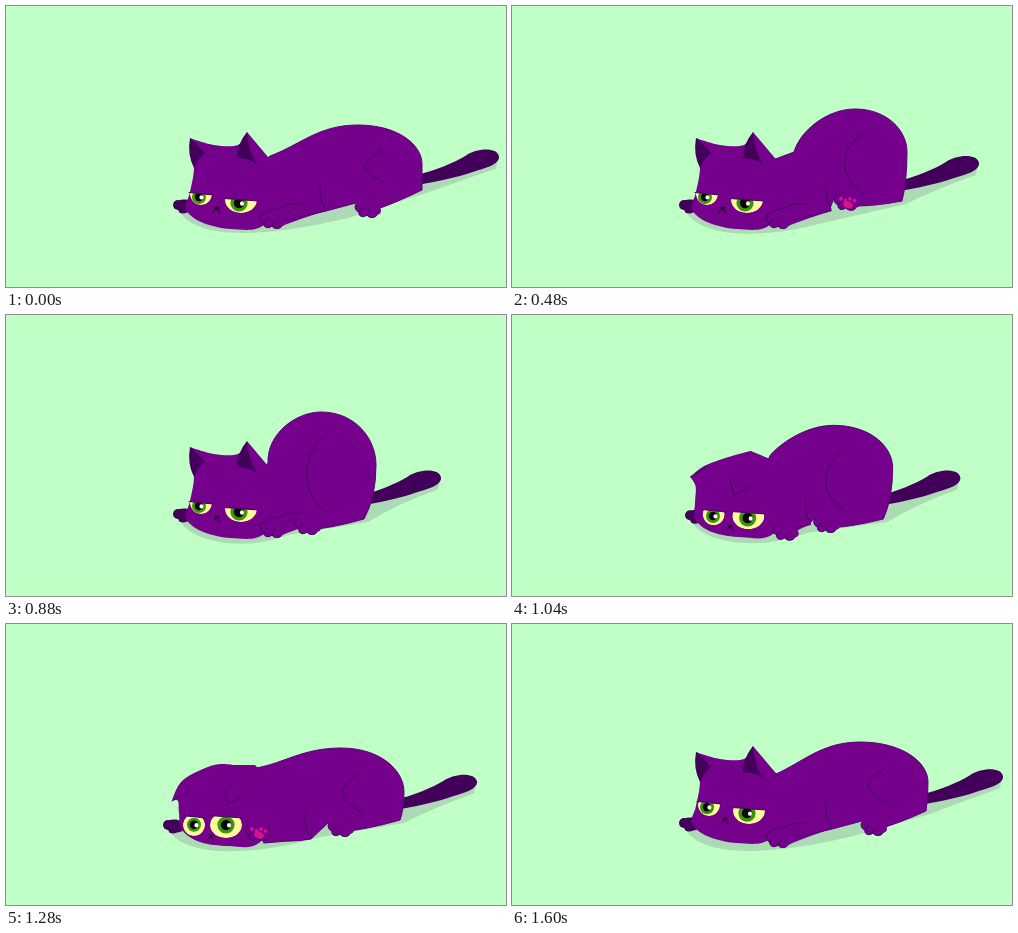
An HTML page with a canvas for the animation above (1680 ms loop, 500x281 px).

```html
<!DOCTYPE html>
<html lang="en">
<head>
<meta charset="utf-8">
<title>Crawling cat</title>
<style>
  html, body { margin: 0; width: 100%; height: 100%; overflow: hidden; background: #c0ffc6; }
  canvas { display: block; width: 500px; height: 281px; }
</style>
</head>
<body>
<canvas id="stage" width="500" height="281"></canvas>
<script>
const ctx = document.getElementById('stage').getContext('2d');
const LOOP = 1680, STEP = 80;
const C = {
  bg: '#c0ffc6', shade: '#abdab5', fur: '#74008c', dark: '#43005b', line: '#43006a',
  yellow: '#fdfb9b', green: '#3e9410', pink: '#d8128c', ink: '#21002f'
};

// Head outline with ears up, and pressed down with ears folded
const UP = [188,161, 184,132, 208,139, 232,139, 241,126, 263,152, 282,180, 258,219, 225,223, 195,216, 180,203, 184,186];
const DOWN = [177,177, 171,177, 182,156, 213,141, 233,141, 254,141, 283,180, 258,219, 228,222, 199,218, 181,206, 178,189];

const mix = (a, b, k) => a + (b - a) * k;
const easeOut = k => 1 - (1 - k) ** 1.5;

// Joints at the turning points of the crawl
const rest = {
  t: 0, neck: [264, 150], top: [352, 119], back: [416, 158], heel: [416, 184], toe: [352, 207],
  elbow: [320, 205], fore: [267, 214], head: [0, 0], face: [215, 191], lids: [0, 0]
};
const poses = [
  rest,
  { ...rest, t: 480, neck: [282, 146], top: [343, 103], back: [395, 146], heel: [390, 195], toe: [325, 211] },
  { ...rest, t: 880, neck: [262, 148], top: [315, 97], back: [370, 150], heel: [358, 204], toe: [292, 215], ease: easeOut },
  {
    t: 1120, neck: [256, 137], top: [325, 117], back: [386, 154], heel: [378, 204], toe: [311, 212],
    elbow: [289, 212], fore: [277, 218], head: [4.5, 0], face: [221, 205], lids: [5, 1]
  },
  {
    t: 1280, neck: [250, 144], top: [335, 124], back: [398, 168], heel: [394, 196], toe: [325, 208],
    elbow: [305, 215], fore: [252, 208], head: [-5, 0], face: [204, 201], lids: [8, 1]
  },
  { ...rest, t: 1600, top: [348, 118], heel: [414, 187], fore: [267, 215], head: [0, -4], face: [217, 184], lids: [2, 0] },
  { ...rest, t: LOOP }
];

function poseAt(t) {
  const i = poses.findIndex(p => p.t > t);
  const a = poses[i - 1], b = poses[i];
  const raw = (t - a.t) / (b.t - a.t), k = b.ease ? b.ease(raw) : raw;
  const p = {};
  for (const key in a) {
    if (Array.isArray(a[key])) p[key] = a[key].map((v, n) => mix(v, b[key][n], k));
  }
  [p.open, p.duck] = p.lids;
  // The hind foot leaves the ground while it steps forward
  const lift = t < 880 ? 14 * Math.sin(Math.PI * (t / 880) ** 2) : 0;
  p.foot = [p.toe[0], p.toe[1] - lift];
  p.far = [176 + 2 * p.head[0], 200 + 2 * p.duck];
  p.tail = [p.heel[0], 62 + 0.6 * p.heel[1]];
  p.skull = UP.map((v, n) => mix(v, DOWN[n], p.duck) + p.head[n % 2]);
  return p;
}

// Closed Catmull-Rom curve; listed points stay sharp
function blob(p, sharp) {
  const n = p.length / 2;
  const at = i => [p[((i + n) % n) * 2], p[((i + n) % n) * 2 + 1]];
  const slope = i => {
    if (sharp.includes(i % n)) return [0, 0];
    const a = at(i - 1), b = at(i + 1);
    return [(b[0] - a[0]) / 6, (b[1] - a[1]) / 6];
  };
  const path = new Path2D();
  path.moveTo(p[0], p[1]);
  for (let i = 0; i < n; i++) {
    const a = at(i), b = at(i + 1), u = slope(i), v = slope(i + 1);
    path.bezierCurveTo(a[0] + u[0], a[1] + u[1], b[0] - v[0], b[1] - v[1], b[0], b[1]);
  }
  path.closePath();
  return path;
}

function fill(path, color) {
  ctx.fillStyle = color;
  ctx.fill(path);
}

function stroke(path, color = C.line) {
  ctx.strokeStyle = color;
  ctx.stroke(path);
}

function oval(x, y, rx, ry, color, turn = 0) {
  const path = new Path2D();
  path.ellipse(x, y, rx, ry, turn, 0, Math.PI * 2);
  fill(path, color);
}

function at([x, y], draw) {
  ctx.save();
  ctx.translate(x, y);
  draw();
  ctx.restore();
}

const shape = d => new Path2D(d);
const tailShape = shape('M-8-3C15-8 32-16 44-23C54-30 75-32 77-22C78-14 62-10 52-7C35-1 15 3-8 7Z');
const pawShape = shape('M-10-7C-15-4-13 2-9 3C-10 8-4 9-1 6C1 10 8 9 9 6C13 5 14 2 12-1L4-8Z');
const pawLines = shape('M-10-7C-15-4-13 2-9 3C-10 8-4 9-1 6C1 10 8 9 9 6M-9 3Q-8 0-5-1M-1 6Q-1 2 2 1');
const sleeve = shape('M-13-3C-8-12 5-10 13-15Q20-17 28-16');
const earL = shape('M0 0Q-3 16 4 30Q8 20 15 15Q6 5 0 0Z');
const earR = shape('M0 0Q-10 12-10 26Q2 26 10 32Q1 18 0 0Z');
const foldL = shape('M0 0L16-10');
const foldR = shape('M-4-15L0 0L20-11');
const mouth = shape('M-4 4Q-2 1 0 1Q2 2 3 5');

function shadow({ far, toe, heel, tail }) {
  const [x, y] = far, [tx, ty] = tail;
  const path = new Path2D();
  path.moveTo(x - 2, y + 6);
  path.bezierCurveTo(x + 12, 229, x + 65, 236, toe[0] - 10, toe[1] + 5);
  path.lineTo(heel[0] + 4, heel[1] + 3);
  path.quadraticCurveTo(tx + 34, ty + 4, tx + 74, ty - 10);
  path.lineTo(tx + 76, ty - 20);
  path.lineTo(tx, ty);
  path.closePath();
  fill(path, C.shade);
}

function torso({ skull, neck, top, back, heel, foot, elbow }) {
  const [nx, ny] = neck, [x, y] = top, [bx, by] = back, [hx, hy] = heel, [fx, fy] = foot;
  const wide = x - nx, rise = ny - y;
  const path = new Path2D();
  path.moveTo(skull[10] - 5, skull[11] + 3);
  path.lineTo(nx, ny);
  // A taller hump starts more steeply
  path.bezierCurveTo(nx + (wide - 54) * 0.9, ny - rise * rise / 85, x - wide * 0.45, y, x, y);
  path.bezierCurveTo(mix(x, bx, 0.62), y, bx, mix(by, y, 0.5), bx, by);
  path.quadraticCurveTo(bx, mix(by, hy, 0.6), hx, hy);
  path.quadraticCurveTo((hx + fx) / 2, (hy + fy) / 2 + 4, fx + 8, fy);
  path.lineTo(fx - 2, fy - 10);
  path.lineTo(Math.min(elbow[0], fx - 8), elbow[1]);
  path.lineTo(258, 219);
  path.closePath();
  fill(path, C.fur);
  stroke(path, '#5b0079');

  const hip = new Path2D();
  hip.moveTo(hx - 40, y + 25);
  hip.bezierCurveTo(hx - 62, y + 40, hx - 66, hy - 24, hx - 36, hy - 6);
  stroke(hip);
}

function foreleg({ elbow, fore }) {
  const [x, y] = elbow, path = new Path2D();
  path.moveTo(x - 25, y - 25);
  path.lineTo(x - 6, y - 25);
  path.quadraticCurveTo(x - 7, y - 12, x, y);
  path.quadraticCurveTo(x - 18, y + 5, fore[0] + 6, fore[1] + 7);
  path.lineTo(fore[0] - 5, fore[1]);
  fill(path, C.fur);
}

function elbowLine([x, y]) {
  const path = new Path2D();
  path.moveTo(x - 6, y - 26);
  path.quadraticCurveTo(x - 7, y - 12, x - 1, y - 2);
  stroke(path);
}

function paw(pos, pads, arm) {
  at(pos, () => {
    fill(pawShape, C.fur);
    stroke(pawLines);
    if (arm) stroke(sleeve);
    if (!pads) return;
    oval(1, 3, 5, 3.5, C.pink, 0.3);
    for (let i = 0; i < 4; i++) oval(-6 + i * 4.5, -3 + (i % 2) * 2, 1.8, 2, C.pink);
  });
}

function farPaw([x, y]) {
  oval(x + 3, y, 10, 6.5, C.dark, 0.15);
  oval(x - 4, y - 1, 5, 5, C.dark);
  oval(x + 1, y + 4, 4.5, 3.5, C.dark);
}

// side: -1 for the small far eye, 1 for the near one
function eye({ face, duck, open }, side) {
  const x = face[0] + side * (20 - 4 * duck), y = face[1] + side * 3 * (1 - duck);
  const rx = 13.5 + 2.5 * side, ry = 12 + side, r = 7.8 + 0.8 * side;
  const lid = new Path2D();
  lid.moveTo(x - rx - 1, y - open - 1.5);
  lid.lineTo(x + rx + 1, y - open + 1);
  const gap = new Path2D(lid), ball = new Path2D();
  gap.lineTo(x + rx + 1, y + ry + 2);
  gap.lineTo(x - rx - 1, y + ry + 2);
  gap.closePath();
  ball.ellipse(x, y, rx, ry, 0, 0, Math.PI * 2);
  at([0, 0], () => {
    ctx.clip(gap);
    ctx.clip(ball);
    fill(ball, C.yellow);
    const ix = x - 2 * (1 - duck), iy = y + 3 - open * 0.4;
    oval(ix, iy, r, r, C.green);
    oval(ix, iy, r * 0.6, r * 0.6, '#080808');
    oval(ix + r * 0.35, iy + r * 0.05, 2, 2.2, '#fff');
  });
  stroke(lid, C.dark);
}

function head(p, folded) {
  const s = p.skull;
  fill(blob(s, [1, 4, 5]), C.fur);
  if (folded) {
    at([s[2], s[3]], () => stroke(foldL));
    at([222, 180], () => stroke(foldR));
  } else {
    at([s[2], s[3]], () => fill(earL, C.dark));
    at([s[8], s[9]], () => fill(earR, C.dark));
  }
  eye(p, -1);
  eye(p, 1);
  at([p.face[0] - 4 + 5 * p.duck, p.face[1] + 11], () => {
    oval(0, 0, 2.4, 1.6, C.ink);
    stroke(mouth, C.ink);
  });
}

function draw(t) {
  const p = poseAt(t), folded = p.duck > 0.45;
  ctx.fillStyle = C.bg;
  ctx.fillRect(0, 0, 500, 281);
  shadow(p);
  at(p.tail, () => fill(tailShape, C.dark));
  farPaw(p.far);
  foreleg(p);
  torso(p);
  head(p, folded);
  if (p.elbow[0] < p.foot[0]) elbowLine(p.elbow);
  paw([p.foot[0] + 10, p.foot[1] - 4], t >= 400 && t < 640, false);
  paw(p.fore, t >= 1200 && t < 1440, !folded);
}

ctx.lineCap = ctx.lineJoin = 'round';
const start = performance.now();
function tick() {
  const t = (performance.now() - start) % LOOP;
  draw(Math.floor(t / STEP) * STEP);
  requestAnimationFrame(tick);
}
tick();
</script>
</body>
</html>
```
